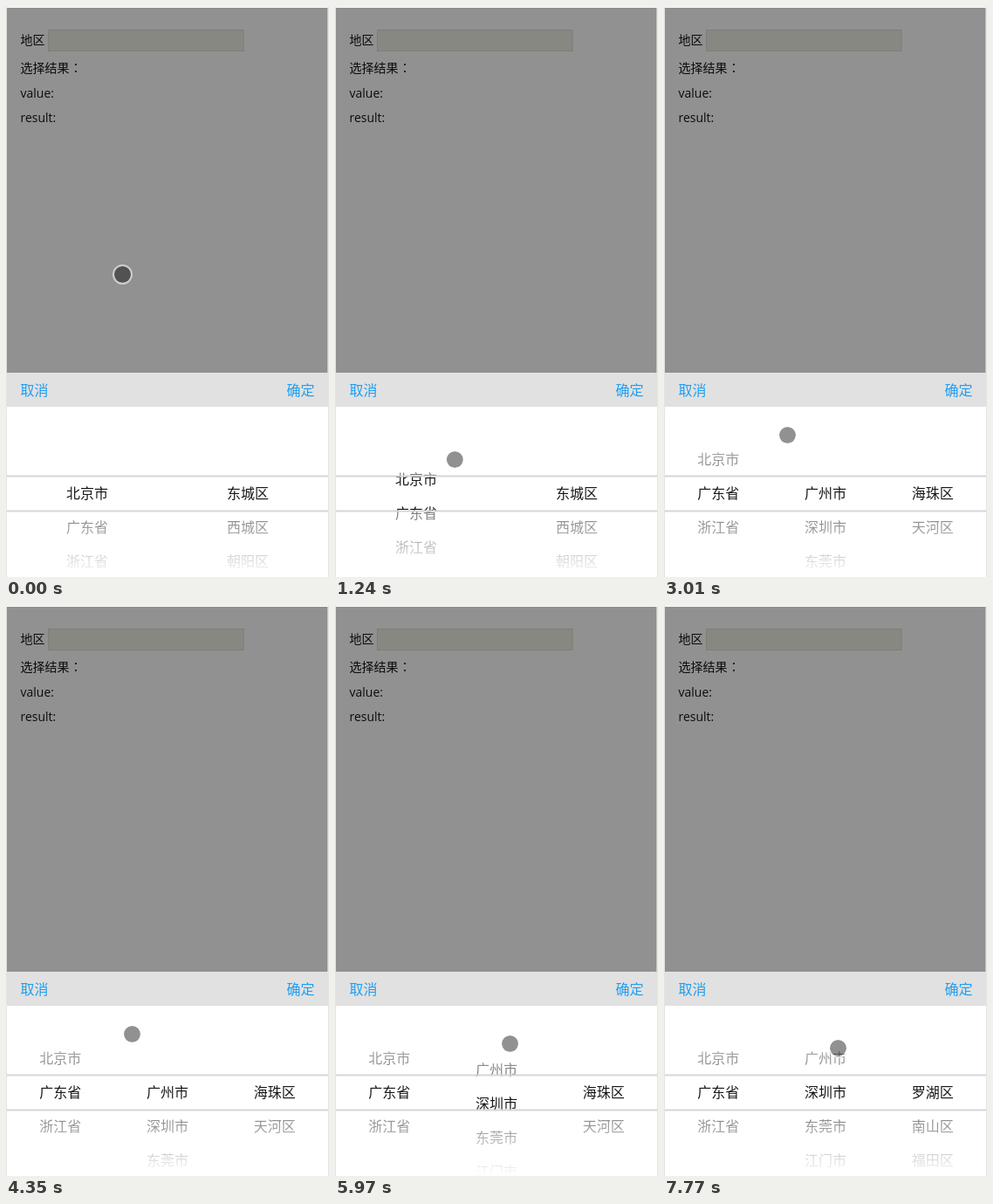
Recreate the animation shown at these times as an HTML page. Size 370x654 px, loop 8000 ms.

```html
<!DOCTYPE html>
<html lang="zh-CN">
<head>
<meta charset="utf-8">
<title>地区</title>
<style>
html, body { margin: 0; width: 100%; height: 100%; overflow: hidden; background: #fff; }
svg { display: block; width: 370px; height: 654px; }
text { font: 16px "Noto Sans CJK SC", "Noto Sans CJK", sans-serif; fill: #181818; }
.form text { font-size: 14px; fill: #0c0c0c; }
.form .latin { font-family: "Open Sans", "Noto Sans", sans-serif; }
.form .colon { font-family: "Noto Sans CJK JP", "Noto Sans CJK", sans-serif; }
.bar text { fill: #1e9ef3; }
.bar .off { fill: #a5c8e4; }
#wheels text { text-anchor: middle; }
</style>
</head>
<body>
<svg viewBox="0 0 370 654">
  <defs>
    <linearGradient id="fade" x1="0" y1="0" x2="0" y2="1">
      <stop offset="0" stop-color="#fff" stop-opacity=".42"/>
      <stop offset="1" stop-color="#fff"/>
    </linearGradient>
    <linearGradient id="fadeUp" href="#fade" x1="0" y1="1" x2="0" y2="0"/>
  </defs>

  <rect width="370" height="654" fill="#fff"/>
  <rect width="370" height="1" fill="#ececec"/>
  <rect x="1" y="2" width="367.5" height="418" fill="#919191"/>

  <g class="form">
    <text x="16.5" y="44.3">地区</text>
    <rect x="48.5" y="27.5" width="223.5" height="24" fill="#878881" stroke="#7d7d79"/>
    <text x="16.5" y="76.3">选择结果</text>
    <text x="73" y="76.3" class="colon">：</text>
    <text x="16.5" y="105" class="latin">value:</text>
    <text x="16.5" y="133" class="latin">result:</text>
  </g>

  <g id="wheels"></g>
  <rect x="1" y="459" width="368" height="80" fill="url(#fadeUp)"/>
  <rect x="1" y="578" width="368" height="76" fill="url(#fade)"/>
  <path d="M1 538.5H369M1 578.5H369" stroke="#d6d6d6" stroke-width="2"/>
  <path d="M.5 1V654M369.5 1V654" stroke="#e4e4e4"/>

  <g class="bar">
    <rect x="1" y="420" width="368" height="39" fill="#e1e1e1"/>
    <text x="16.5" y="446">取消</text>
    <text x="321.5" y="446" id="ok">确定</text>
  </g>

  <g id="touch">
    <circle r="9.5" fill="#000" fill-opacity=".43"/>
    <circle r="10.5" fill="none" stroke="#fff" stroke-opacity=".55" stroke-width="2"/>
  </g>
</svg>
<script>
const LOOP = 8000, TICK = 135;
const ROW = 39, MID = 558, WIDTH = 368;
const $ = id => document.getElementById(id);

const provinces = ['北京市', '广东省', '浙江省'];
const beijing = ['东城区', '西城区', '朝阳区'];
const cities = ['广州市', '深圳市', '东莞市', '江门市'];
const guangzhou = ['海珠区', '天河区'];
const shenzhen = ['罗湖区', '南山区', '福田区'];

// Moments of letting go of a wheel, and of its districts arriving
const provinceSet = 1940, firstLoaded = 3010;
const citySet = 6910, secondLoaded = 7770;

const linear = u => u;
const smooth = u => u * u * (3 - 2 * u);
const mix = (a, b, u) => a + (b - a) * u;
const progress = (t, from, to) => Math.min(1, Math.max(0, (t - from) / (to - from)));

// Moves of the finger: rests at each point until the next move begins
const rest = { x: 133.5, y: 307.5 };
const moves = [
  { from: 0, to: TICK, x: 141.5, y: 480.5 },
  { from: TICK, to: 540, x: 134.5, y: 538.5 },
  { from: 850, to: 1755, x: 141.5, y: 491.5 },
  { from: 4185, to: 4320, x: 144.5, y: 491.5 },
  { from: 4320, to: 5130, x: 201.5, y: 541, ease: smooth },
  { from: 5535, to: 5940, x: 200.5, y: 502.5 },
  { from: 5940, to: 6210, x: 200.5, y: 494.5 },
  { from: 6885, to: 7020, x: 199.5, y: 507.5 }
];

function touchAt(t) {
  return moves.reduce((p, { from, to, x, y, ease = linear }) => {
    const u = ease(progress(t, from, to));
    return { x: mix(p.x, x, u), y: mix(p.y, y, u) };
  }, rest);
}

// A wheel follows the finger once it has passed the grip height
const follow = (y, grip, gain = 1) => Math.min(0, (y - grip) * gain);

function makeWheel() {
  return Array.from({ length: 4 }, () => {
    const label = document.createElementNS('http://www.w3.org/2000/svg', 'text');
    $('wheels').append(label);
    return label;
  });
}
const wheels = [0, 1, 2].map(makeWheel);

function drawWheel(col, items, scroll, width) {
  wheels[col].forEach((label, row) => {
    const word = items[row] || '';
    if (label.textContent !== word) label.textContent = word;
    label.setAttribute('x', 1 + width * (col + .5));
    label.setAttribute('y', MID + 6 + row * ROW + scroll);
  });
}

function districts(t) {
  if (t >= secondLoaded) return shenzhen;
  return t >= firstLoaded && t < citySet ? guangzhou : [];
}

function draw(t) {
  const step = Math.floor(t / TICK) * TICK;
  const { x, y } = touchAt(step);
  const settle = smooth(progress(step, 1980, 2290));
  const width = mix(WIDTH / 2, WIDTH / 3, settle);
  const pulled = step < 850 ? 0 : follow(y, 535.5);
  const flung = step < 5535 ? 0 : follow(y, 515.5, 2);
  const third = districts(t);

  drawWheel(0, provinces, mix(pulled, -ROW, settle), width);
  drawWheel(1, t < provinceSet ? beijing : cities, t < citySet ? flung : -ROW, width);
  drawWheel(2, third, 0, width);
  $('ok').classList.toggle('off', t >= provinceSet && !third.length);
  $('touch').setAttribute('transform', `translate(${x} ${y})`);
}

const begin = performance.now();
function tick() {
  draw((performance.now() - begin) % LOOP);
  requestAnimationFrame(tick);
}
tick();
</script>
</body>
</html>
```
